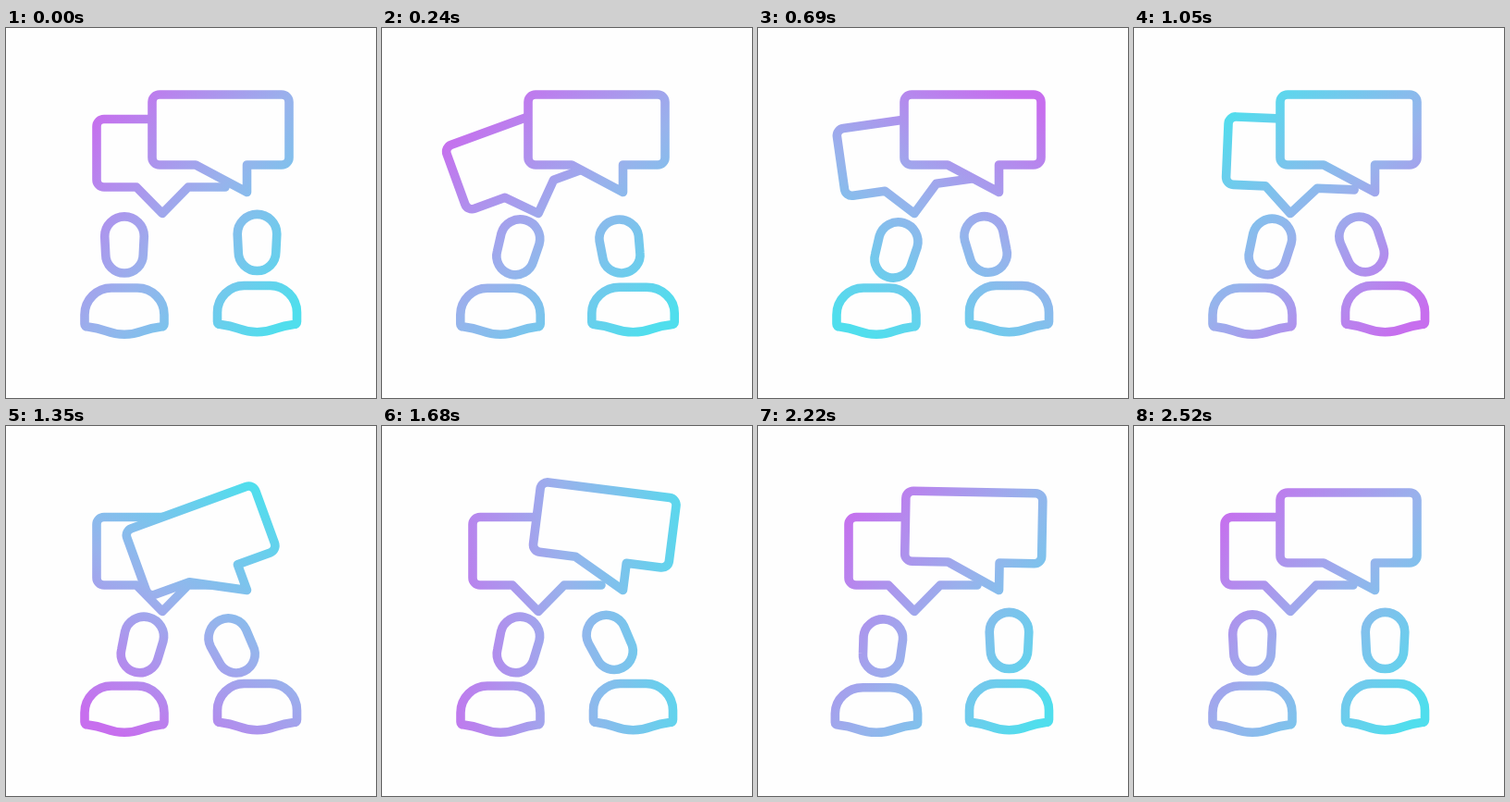
Animation, 400 px wide and 400 px high, one loop 4550 ms. Source, as an HTML page with a canvas:

```html
<!DOCTYPE html>
<html lang="en">
<head>
<meta charset="utf-8">
<title>Conversation</title>
<style>
  html, body { margin: 0; width: 100%; height: 100%; overflow: hidden; background: #fefefe; }
  canvas { display: block; }
</style>
</head>
<body>
<canvas id="stage" width="400" height="400"></canvas>
<script>
const ctx = document.getElementById('stage').getContext('2d');
const LOOP = 4550, ACTIVE = 2520, STEP = 30;
const SWING = 240, MOVE = 250;

const leftBubble = new Path2D('M200 98.5H106a8 8 0 0 0-8 8V164a8 8 0 0 0 8 8H141L169 200.5 197 172H237');
const rightBubble = new Path2D('M166 72H298a8 8 0 0 1 8 8V140a8 8 0 0 1-8 8H260.5V177.5L205 148H166a8 8 0 0 1-8-8V80a8 8 0 0 1 8-8Z');
const head = new Path2D('M-21.3-9.3A21.3 21.3 0 0 1 21.3-9.3L20.3 10.2A20.3 20.3 0 0 1-20.3 10.2Z');
// Shoulders, with the origin at the middle of the lower edge
const body = new Path2D('M-14-50H14A29 29 0 0 1 43-21V-11Q43-8 39.5-8C31-7 27-6 20-3.5Q0 4-20-3.5C-27-6-31-7-39.5-8Q-43-8-43-11V-21A29 29 0 0 1-14-50Z');

const people = [
  { x: 128, y: 234.5, floor: 331, shift: 19, tilt: 16, relax: 2, enter: 0, exit: 2070, nod: 690 },
  { x: 271.5, y: 232, floor: 328.5, shift: -25, tilt: -14, relax: 12, enter: 105, exit: 1850, nod: 1350 }
];

const progress = (t, start, length) => Math.min(1, Math.max(0, (t - start) / length));
const smooth = p => (1 - Math.cos(Math.PI * p)) / 2;
const bump = p => Math.sin(Math.PI * p);

// Swings to alternating sides, a little less each time
function swing(t) {
  const peak = k => k > 0 && k < 5 ? (-1) ** k * (25.5 - 5.5 * k) : 0;
  const beat = Math.max(0, t / SWING), k = Math.floor(beat);
  return peak(k) + (peak(k + 1) - peak(k)) * smooth(beat - k);
}

// cubic-bezier(.4, 0, .35, 1)
function ease(x) {
  let lo = 0, hi = 1;
  for (let i = 0; i < 24; i++) {
    const u = (lo + hi) / 2, v = 1 - u;
    if (1.2 * u * v * v + 1.05 * u * u * v + u ** 3 < x) lo = u; else hi = u;
  }
  return lo * lo * (3 - 2 * lo);
}

function draw(path, matrix, fill) {
  const shape = new Path2D();
  shape.addPath(path, matrix);
  if (fill) ctx.fill(shape);
  ctx.stroke(shape);
}

const pivot = (x, y, angle) => new DOMMatrix().translate(x, y).rotate(angle).translate(-x, -y);

function drawPerson(p, t) {
  const going = progress(t, p.enter, MOVE), coming = progress(t, p.exit, MOVE);
  const lean = smooth(going) - smooth(coming);
  const squash = bump(going) + bump(coming);
  const nod = 3.5 * bump(progress(t, p.nod - 300, 600));
  const tilt = p.tilt - p.relax * smooth(progress(t, 690, 660));

  draw(head, new DOMMatrix()
    .translate(p.x + p.shift * lean + Math.sign(p.shift) * nod * .6, p.y + 2 * lean + 3 * squash + nod)
    .rotate(tilt * lean)
    .scale(1, 1 - .05 * squash));
  draw(body, new DOMMatrix().translate(p.x, p.floor).scale(1 + .04 * squash, 1 - .036 * squash));
}

function paint(t) {
  const turn = (40 + 360 * ease(t / ACTIVE)) * Math.PI / 180;
  const dx = 152 * Math.cos(turn), dy = 152 * Math.sin(turn);
  const ink = ctx.createLinearGradient(200 - dx, 203 - dy, 200 + dx, 203 + dy);
  ['#c76eee', '#98b2ec', '#50deed'].forEach((colour, i) => ink.addColorStop(i / 2, colour));

  ctx.fillStyle = '#fefefe';
  ctx.fillRect(0, 0, 400, 400);
  ctx.strokeStyle = ink;
  ctx.lineWidth = 9.6;
  ctx.lineJoin = ctx.lineCap = 'round';

  draw(leftBubble, pivot(169, 200.5, swing(t)));
  draw(rightBubble, pivot(260.5, 177.5, swing(t - 1110)), true);
  people.forEach(p => drawPerson(p, t));
}

function frame(now) {
  const t = now % LOOP;
  paint(Math.min(Math.floor(t / STEP) * STEP, ACTIVE));
  requestAnimationFrame(frame);
}
paint(0);
requestAnimationFrame(frame);
</script>
</body>
</html>
```
